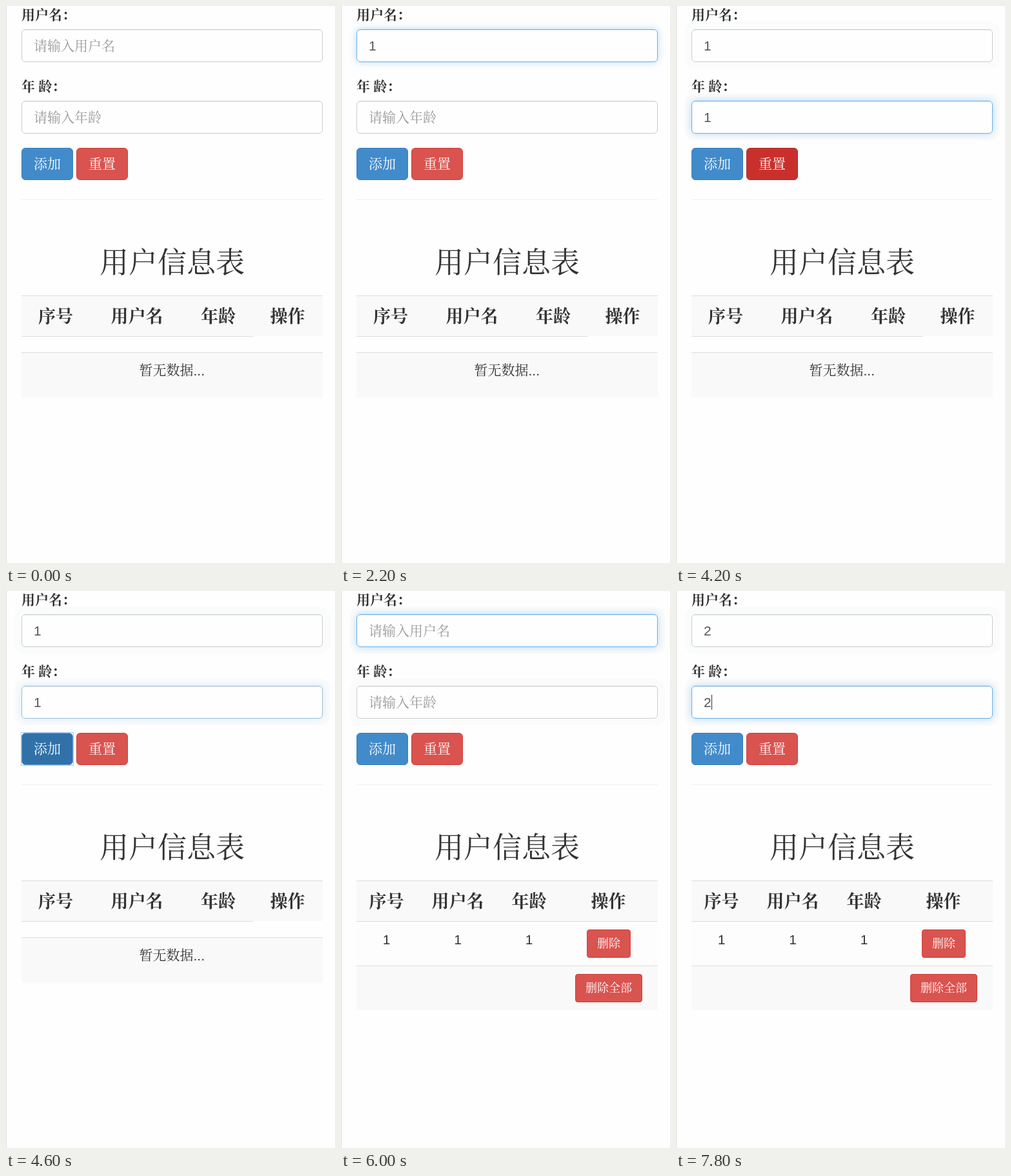
An HTML page with a canvas for the animation above (8 s loop, 510 by 864 pixels).

```html
<!DOCTYPE html>
<html lang="zh-CN">
<head>
<meta charset="utf-8">
<title>用户信息表</title>
<style>
html, body { margin: 0; width: 100%; height: 100%; overflow: hidden; background: #fefefe; }
canvas { display: block; }
</style>
</head>
<body>
<canvas id="stage" width="510" height="864"></canvas>
<script>
const ctx = document.getElementById('stage').getContext('2d');
const LOOP = 8000;
const CJK = '"Noto Serif CJK SC", "Noto Sans CJK SC", "Noto Sans CJK", serif';
const LATIN = '"Liberation Sans", Arial, sans-serif';
const BLUE = { fill: '#428bca', edge: '#357ebd' };
const BLUE_HOVER = { fill: '#3276b1', edge: '#285e8e' };
const BLUE_ACTIVE = { fill: '#3071a9', edge: '#6a9fe0' };
const RED = { fill: '#d9534f', edge: '#d43f3a' };
const RED_HOVER = { fill: '#c9302c', edge: '#ac2925' };

const within = (t, ...spans) => spans.some(([a, b]) => t >= a && t < b);
const mix = (a, b, k) => `rgb(${a.map((v, i) => Math.round(v + (b[i] - v) * k))})`;

// Value at time t from [start, value] pairs.
const at = (t, keys) => keys.reduce((v, [start, next]) => t >= start ? next : v, keys[0][1]);

function rect(x, y, w, h, color) {
  ctx.fillStyle = color;
  ctx.fillRect(x, y, w, h);
}

function rounded(x, y, w, h, r) {
  ctx.beginPath();
  ctx.roundRect(x, y, w, h, r);
}

// Places text by the vertical middle of its glyphs, on a whole-pixel baseline.
function text(str, x, cy, size, { color = '#333', weight = 400, align = 'left', font = CJK } = {}) {
  ctx.font = `${weight} ${size}px ${font}`;
  ctx.textAlign = align;
  ctx.fillStyle = color;
  ctx.fillText(str, x, Math.round(cy + size * 0.36 - (font === CJK ? 0.5 : 0)));
}

function button(label, x, y, w, h, size, style, r = 6) {
  rounded(x + 0.5, y + 0.5, w - 1, h - 1, r - 0.5);
  ctx.fillStyle = style.fill;
  ctx.strokeStyle = style.edge;
  ctx.fill();
  ctx.stroke();
  text(label, x + w / 2, y + h / 2, size, { color: '#fff', weight: 500, align: 'center' });
}

function field(y, { value, hint, focus, caret, used }) {
  if (used) {
    rounded(14, y - 11, 488, 72, 14);
    ctx.fillStyle = '#fafbfb';
    ctx.fill();
  }
  rounded(24, y, 467, 51, 6);
  ctx.save();
  if (focus) {
    ctx.shadowColor = `rgba(102,175,233,${0.45 * focus})`;
    ctx.shadowBlur = 12;
  }
  ctx.fillStyle = '#fefefe';
  ctx.fill();
  ctx.restore();
  rect(28, y + 1, 459, 1, 'rgba(0,0,0,.06)');
  rounded(24.5, y + 0.5, 466, 50, 5.5);
  ctx.strokeStyle = mix([204, 204, 204], [102, 175, 233], focus);
  ctx.stroke();

  if (value) text(value, 43, y + 25.5, 21, { color: '#555', font: LATIN });
  else text(hint, 43, y + 25.5, 21, { color: '#999' });
  if (caret) rect(value ? 55 : 43, y + 14, 1, 23, '#333');
}

function headers(centers) {
  rect(24, 449, 467, 1, '#ddd');
  rect(24, 450, 467, 62, '#f9f9f9');
  ['序号', '用户名', '年龄', '操作'].forEach((name, i) =>
    text(name, centers[i], 481.5, 27, { weight: 600, align: 'center' }));
}

function emptyTable() {
  headers([77, 203, 329, 436.5]);
  rect(24, 512, 359, 1, '#ddd');
  rect(24, 537, 467, 1, '#ddd');
  rect(24, 538, 467, 69, '#f9f9f9');
  text('暂无数据', 206.5, 565, 21);
  text('...', 290.5, 565, 21, { font: LATIN });
}

function filledTable() {
  const centers = [70.5, 181, 291.5, 414.5];
  headers(centers);
  rect(24, 512, 467, 1, '#ddd');
  rect(24, 513, 467, 68, '#fdfdfd');
  rect(24, 581, 467, 1, '#ddd');
  rect(24, 582, 467, 68, '#f9f9f9');
  for (const x of centers.slice(0, 3)) text('1', x, 540, 21, { align: 'center', font: LATIN });
  button('删除', 381, 525, 68, 44, 18, RED, 4);
  button('删除全部', 363, 594, 104, 44, 18, RED, 4);
}

function draw(t) {
  rect(0, 0, 510, 864, '#fefefe');
  rect(0, 0, 1, 864, '#ddd');

  field(36, {
    value: at(t, [[0, ''], [1700, '1'], [4700, ''], [6100, '2']]),
    hint: '请输入用户名',
    focus: at(t, [[0, 0], [900, 0.5], [1000, 1], [2700, 0.5], [2800, 0],
      [5400, 0.5], [5500, 1], [7100, 0.5], [7200, 0]]),
    caret: within(t, [900, 1500], [1700, 2200], [5400, 6000], [6100, 6600]),
    used: t >= 2700
  });
  field(147, {
    value: at(t, [[0, ''], [3300, '1'], [4700, ''], [7800, '2']]),
    hint: '请输入年龄',
    focus: at(t, [[0, 0], [2700, 0.5], [2800, 1], [4600, 0.5], [4700, 0.12],
      [4800, 0], [7100, 0.5], [7200, 1]]),
    caret: within(t, [2700, 3800], [4300, 4600], [7100, 8000]),
    used: t >= 2700
  });
  text('用户名：', 24, 14, 21, { weight: 600 });
  text('年 龄：', 24, 125, 21, { weight: 600 });

  const addStyle = at(t, [[0, BLUE], [4300, BLUE_HOVER], [4600, BLUE_ACTIVE], [5400, BLUE]]);
  if (addStyle === BLUE_ACTIVE) {
    ctx.strokeStyle = '#a9c8ee';
    ctx.strokeRect(23.5, 219.5, 81, 51);
  }
  button('添加', 24, 220, 80, 50, 21, addStyle);
  button('重置', 109, 220, 80, 50, 21, within(t, [4200, 4300]) ? RED_HOVER : RED);
  rect(24, 300, 467, 1, '#eee');

  text('用户信息表', 257.5, 398, 45, { weight: 200, align: 'center' });
  if (t < 4700) emptyTable();
  else filledTable();
}

const start = performance.now();
function tick() {
  draw((performance.now() - start) % LOOP);
  requestAnimationFrame(tick);
}
tick();
</script>
</body>
</html>
```
